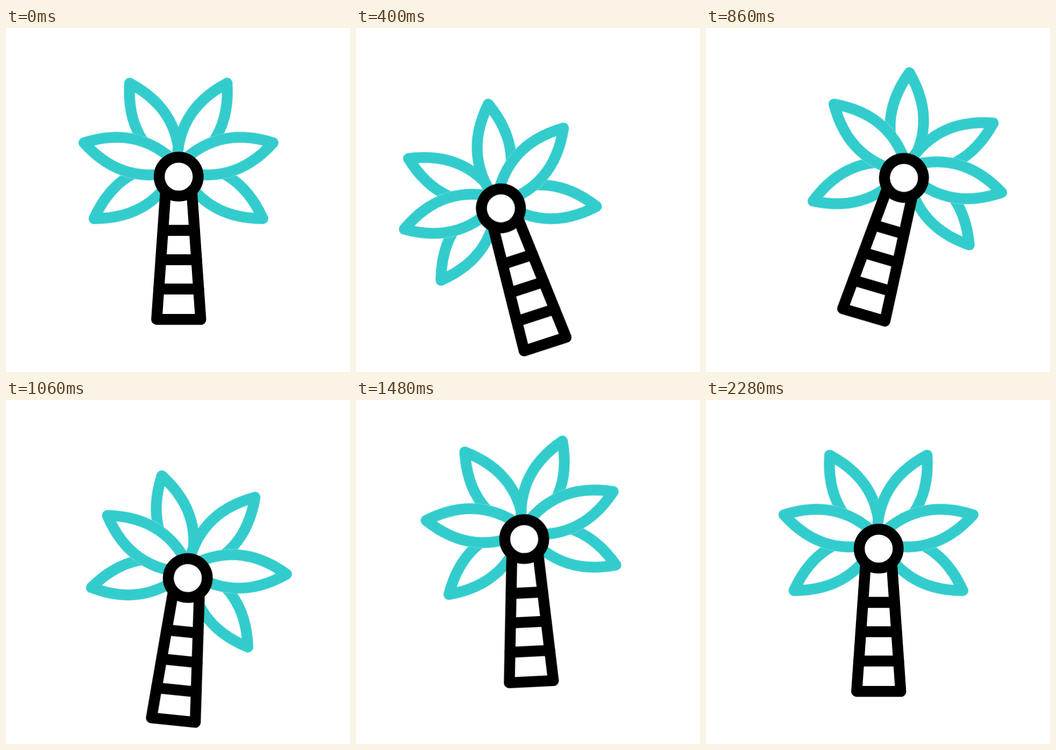
An HTML page without scripts for the animation above (2.4 s loop, 640 by 640 pixels).

```html
<!DOCTYPE html>
<html lang="en">
<head>
<meta charset="utf-8">
<title>Swaying palm</title>
<style>
  html, body { margin: 0; height: 100%; overflow: hidden; background: #fff; }
  svg { display: block; width: 100%; height: 100%; }

  svg { fill: #fff; stroke-width: 20.3; stroke-linecap: round; stroke-linejoin: round; }
  .trunk { stroke: #000; }
  #leaf { stroke: #33cccd; }
  #rim { stroke: #fff; stroke-width: 20.7; }

  .bob, .sway { animation: 2400ms cubic-bezier(.333, 0, .667, 1) infinite; }
  .bob { animation-name: bob; }
  .sway { animation-name: sway; animation-delay: var(--lag, 0ms); }
  .palm { transform-origin: 321.3px 443.5px; }
  .left { transform-origin: 314.3px 261.5px; }
  .right { transform-origin: 328.3px 261.5px; }

  @keyframes bob {
    0%, 90%, 100% { transform: translateY(0); }
    15% { transform: translateY(54px); }
    30% { transform: translateY(-34.8px); }
    45% { transform: translateY(54.6px); }
    60% { transform: translateY(-19.2px); }
    75% { transform: translateY(15.5px); }
  }
  @keyframes sway {
    0%, 85.8%, 100% { transform: rotate(0deg); }
    17.7% { transform: rotate(-18.2deg); }
    36.3% { transform: rotate(16.4deg); }
    53.6% { transform: rotate(-7.9deg); }
    71.3% { transform: rotate(3.6deg); }
  }
</style>
</head>
<body>
<svg viewBox="0 0 640 640">
  <defs>
    <!-- Leaf outline, drawn from its tip towards the crown -->
    <path id="blade" d="M0 0C64 41.5 126 41.5 190 0C126 -41.5 64 -41.5 0 0Z"/>
    <use id="leaf" href="#blade"/>
    <use id="rim" href="#blade"/>
    <g id="front"><use href="#rim"/><use href="#leaf"/></g>
  </defs>

  <g class="bob">
    <g class="sway palm">
      <g class="sway left" style="--lag: 30ms"><use href="#leaf" transform="translate(230.1 102.7) rotate(60.9)"/></g>
      <g class="sway right" style="--lag: 16ms"><use href="#leaf" transform="translate(411.3 102.7) rotate(119.1)"/></g>
      <g class="sway left" style="--lag: 242ms"><use href="#leaf" transform="translate(163.8 354.6) rotate(-32.9)"/></g>
      <g class="sway right" style="--lag: 180ms"><use href="#leaf" transform="translate(477.8 354.6) rotate(-147.1)"/></g>
      <g class="sway left" style="--lag: 98ms"><use href="#front" transform="translate(145.1 213.6) rotate(15.1)"/></g>
      <g class="sway right" style="--lag: 82ms"><use href="#front" transform="translate(496.9 213.6) rotate(164.9)"/></g>

      <g class="trunk">
        <path d="M297 303L280.3 542.2H362.3L345.6 303"/>
        <path d="M291.9 376.5H350.7M288 431.2H354.6M284.2 485.7H358.4"/>
        <circle cx="321.3" cy="276.5" r="36.2"/>
      </g>
    </g>
  </g>
</svg>
</body>
</html>
```
